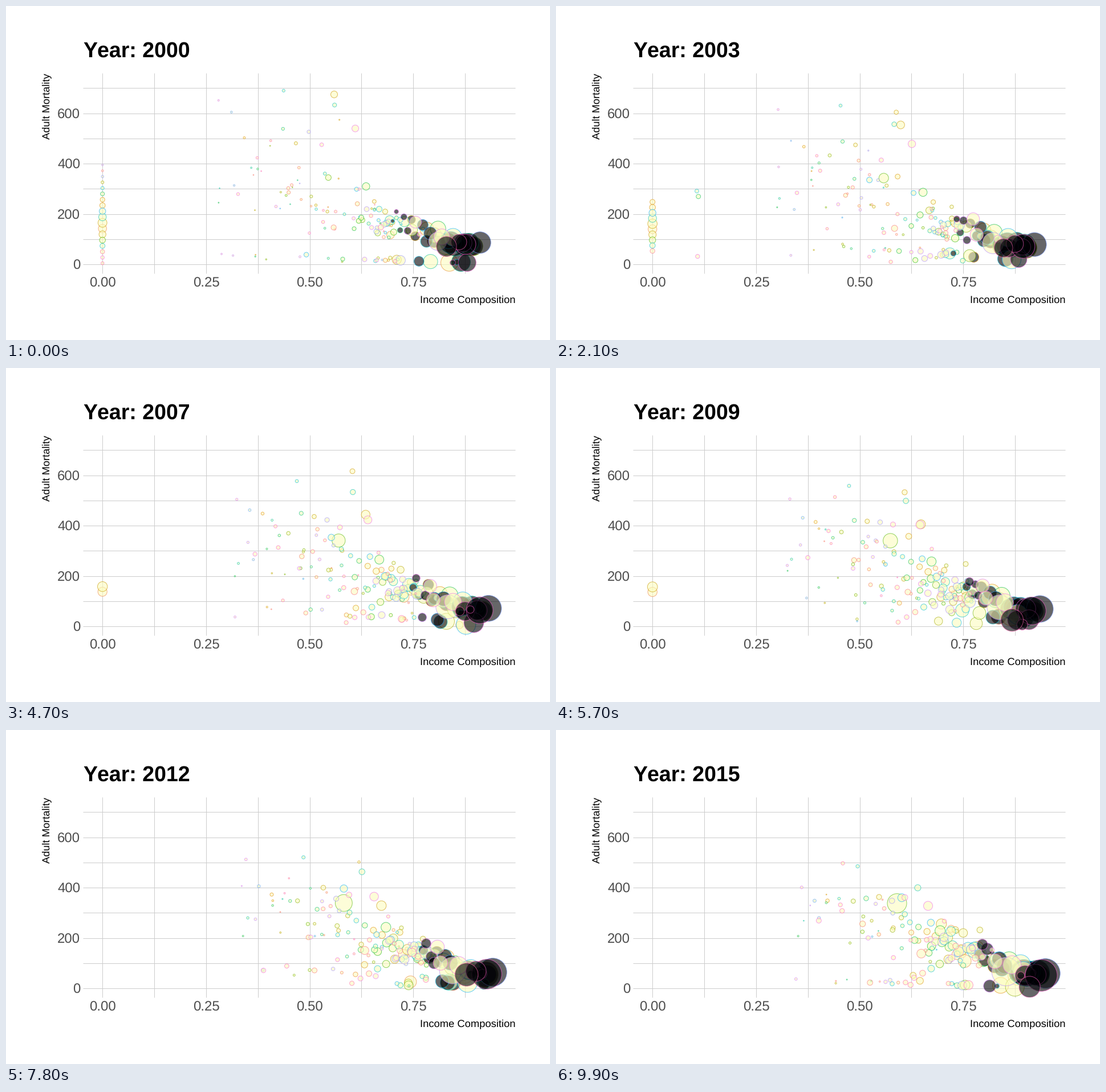
A matplotlib script for the animation above (10 s loop, 954 by 587 pixels).

```python
import numpy as np
import matplotlib.pyplot as plt
from matplotlib.animation import FuncAnimation
from matplotlib.patches import Rectangle

W, H, DPI = 954, 587, 64
PT = 72 / DPI  # points per pixel
FRAMES, FIRST, SPAN = 100, 2000, 15
COUNTRIES = 183
X_ZERO, X_UNIT = 169.2, 726.8
Y_ZERO, Y_UNIT = 454.3, 0.4428
LEFT, RIGHT, TOP, BOTTOM = 135, 893, 118, 469.5
ALPHA = 0.6

plt.rcParams["font.family"] = "Liberation Sans"
plt.rcParams["text.hinting"] = "none"
rng = np.random.default_rng(7)
years = np.arange(SPAN + 1)
growth = (years / SPAN) ** 0.8

# Landmarks: rank, developed, then (start, end) of income, mortality, radius.
LANDMARKS = [
    (23, False, (.559, .697), (675, 256), (6, 9)),
    (53, False, (.545, .590), (345, 338), (5, 17)),
    (60, False, (.636, .694), (310, 229), (6.5, 9)),
    (94, False, (.437, .495), (690, 485), (2.5, 3)),
    (124, True, (.911, .948), (87, 60), (19, 26)),
    (133, False, (.809, .853), (92, 67), (16, 25)),
    (150, False, (.610, .665), (540, 328), (6, 8)),
    (159, True, (.876, .938), (80, 52), (18, 28)),
]


def ramp(ends):
    return ends[0] + (ends[1] - ends[0]) * growth


def lose_digit(values, chance, factor):
    """Reports now and then lack a digit, so a value shrinks for a year."""
    return np.where(rng.random(values.size) < chance, values * factor, values)


def country(rank, rich, x, y, r, low=0.0, small=0.0, noise=0.0):
    ys = ramp(y) * np.exp(rng.normal(0, noise, years.size))
    return (rank, rich, ramp(x), lose_digit(ys, low, 0.1),
            np.maximum(lose_digit(ramp(r), small, 0.316), 0.8))


def shares(n):
    """n evenly spread values of 0..1, from poorest to richest."""
    return np.linspace(0, 1, n)


def build():
    dots = [country(*row) for row in LANDMARKS]
    taken = {row[0] for row in LANDMARKS}
    ranks = [int(k) for k in rng.permutation(COUNTRIES) if k not in taken]

    for q in shares(15):  # leading developed economies
        y = rng.uniform(70, 100)
        dots.append(country(
            ranks.pop(), True, (.825 + .07 * q, .885 + .05 * q), (y, .72 * y),
            (rng.uniform(13, 20), rng.uniform(16, 24)), .13, .25))

    for q in shares(12):  # developed economies that catch up
        y = rng.normal(1, .15)
        dots.append(country(
            ranks.pop(), True, (.70 + .1 * q, .79 + .065 * q),
            (y * (195 - 105 * q), y * (150 - 75 * q)),
            (3 + 9 * q, 9 + 5 * q), .12, .08, .05))

    for q in shares(17):  # wealthy developing countries
        y = rng.normal(1, .15)
        dots.append(country(
            ranks.pop(), False, (.71 + .145 * q, .785 + .11 * q),
            (y * (155 - 70 * q), y * (135 - 65 * q)),
            (8 + 8 * q, 10 + 8 * q), .17, .12, .05))

    for q in shares(10):  # very high mortality
        x, y = .28 + .28 * q, rng.uniform(420, 670)
        dots.append(country(
            ranks.pop(), False, (x, x + .08), (y, .4 * y + 150),
            (1.5 + 2 * q, 2.5 + 3 * q), 0, .15, .04))

    # Income reads zero at first; bigger economies take longer to report.
    levels = sorted(np.linspace(5, 395, 18), key=lambda v: abs(v - 160))
    last_zero = np.repeat([10, 5, 3, 1], [2, 8, 3, 5])
    for y, last in zip(levels, last_zero):
        x = .73 - .0009 * abs(y - 160)
        r = 1.3 * np.exp(8 * (x - .5))
        dot = country(ranks.pop(), False, (x - .03, x + .02),
                      (y, .8 * y + 20), (r, r + 1.5))
        dot[2][:last + 1] = 0
        dots.append(dot)

    for rank in ranks:  # everyone else
        if rng.random() < .36:
            x = rng.uniform(.26, .54)
        else:
            x = rng.triangular(.52, .69, .74)
        y = 345 - 440 * (x - .3)
        y *= np.exp(rng.normal(0, .27))
        r = 1.35 * np.exp(2.7 * (x - .3) + rng.normal(0, .35))
        dots.append(country(
            rank, False, (x, x + rng.uniform(.05, .11)), (y, .9 * y),
            (r, 1.7 * r), .19, .13, .06))
    return sorted(dots, key=lambda d: d[0])


def hue_color(rank):
    """Evenly spaced hue at luminance 65 and chroma 100 (CIE LUV)."""
    h = np.radians(15 + 360 * rank / COUNTRIES)
    up = 100 * np.cos(h) / (13 * 65) + 0.19784
    vp = 100 * np.sin(h) / (13 * 65) + 0.46834
    lum = ((65 + 16) / 116) ** 3
    xyz = lum * np.array([9 * up / (4 * vp), 1,
                          (12 - 3 * up - 20 * vp) / (4 * vp)])
    rgb = np.array([[3.2406, -1.5372, -0.4986],
                    [-0.9689, 1.8758, 0.0415],
                    [0.0557, -0.2040, 1.0570]]) @ xyz
    rgb = np.clip(rgb, 0, 1)
    return np.where(rgb > 0.0031308,
                    1.055 * np.maximum(rgb, 1e-9) ** (1 / 2.4) - 0.055,
                    12.92 * rgb)


dots = build()
px = X_ZERO + X_UNIT * np.array([d[2] for d in dots])
py = Y_ZERO - Y_UNIT * np.array([d[3] for d in dots])
radius = np.array([d[4] for d in dots])
faces = [("#000004" if d[1] else "#FCFDBF", ALPHA) for d in dots]
edges = [(*hue_color(d[0]), ALPHA) for d in dots]

fig = plt.figure(figsize=(W / DPI, H / DPI), dpi=DPI, facecolor="white")
ax = fig.add_axes([0, 0, 1, 1])
ax.set(xlim=(0, W), ylim=(H, 0))
ax.axis("off")


def label(x, y, text, size, **kw):
    return ax.text(x, y, text, fontsize=size * PT, **kw)


grid = dict(color="#cccccc", lw=PT, solid_capstyle="butt", zorder=1)
for k in range(8):
    gx = X_ZERO + X_UNIT * k / 8
    gy = Y_ZERO - Y_UNIT * 100 * k
    ax.plot([gx, gx], [TOP, BOTTOM], **grid)
    ax.plot([LEFT, RIGHT], [gy, gy], **grid)
    if k % 2 == 0:
        label(gx + 0.3, 493.5, f"{k / 8:.2f}", 24, color="#4d4d4d", ha="center")
        label(130, gy + 8.7, f"{100 * k}", 24, color="#4d4d4d", ha="right")

label(RIGHT, 521, "Income Composition", 18.4, ha="right")
label(76.5, TOP, "Adult Mortality", 18.3, ha="right", va="baseline",
      rotation=90, rotation_mode="anchor")
# The first letter stands alone so that the pair is not kerned.
label(LEFT, 90, "Y", 37.5, weight="bold")
title = label(LEFT + 25, 90, "", 37.5, weight="bold")

bubbles = ax.scatter(px[:, 0], py[:, 0], s=1, facecolors=faces,
                     edgecolors=edges, linewidths=PT, zorder=3)
bubbles.set_clip_path(Rectangle((LEFT, TOP), RIGHT - LEFT, BOTTOM - TOP,
                                transform=ax.transData))


def at(values, pos):
    k = min(int(pos), SPAN - 1)
    return values[:, k] + (values[:, k + 1] - values[:, k]) * (pos - k)


def update(i):
    pos = SPAN * i / (FRAMES - 1)
    bubbles.set_offsets(np.column_stack([at(px, pos), at(py, pos)]))
    bubbles.set_sizes((2 * at(radius, pos) * PT) ** 2)
    title.set_text(f"ear: {FIRST + round(pos)}")
    return bubbles, title


anim = FuncAnimation(fig, update, frames=FRAMES, interval=100,
                     repeat=True, repeat_delay=0)
plt.show()
```
